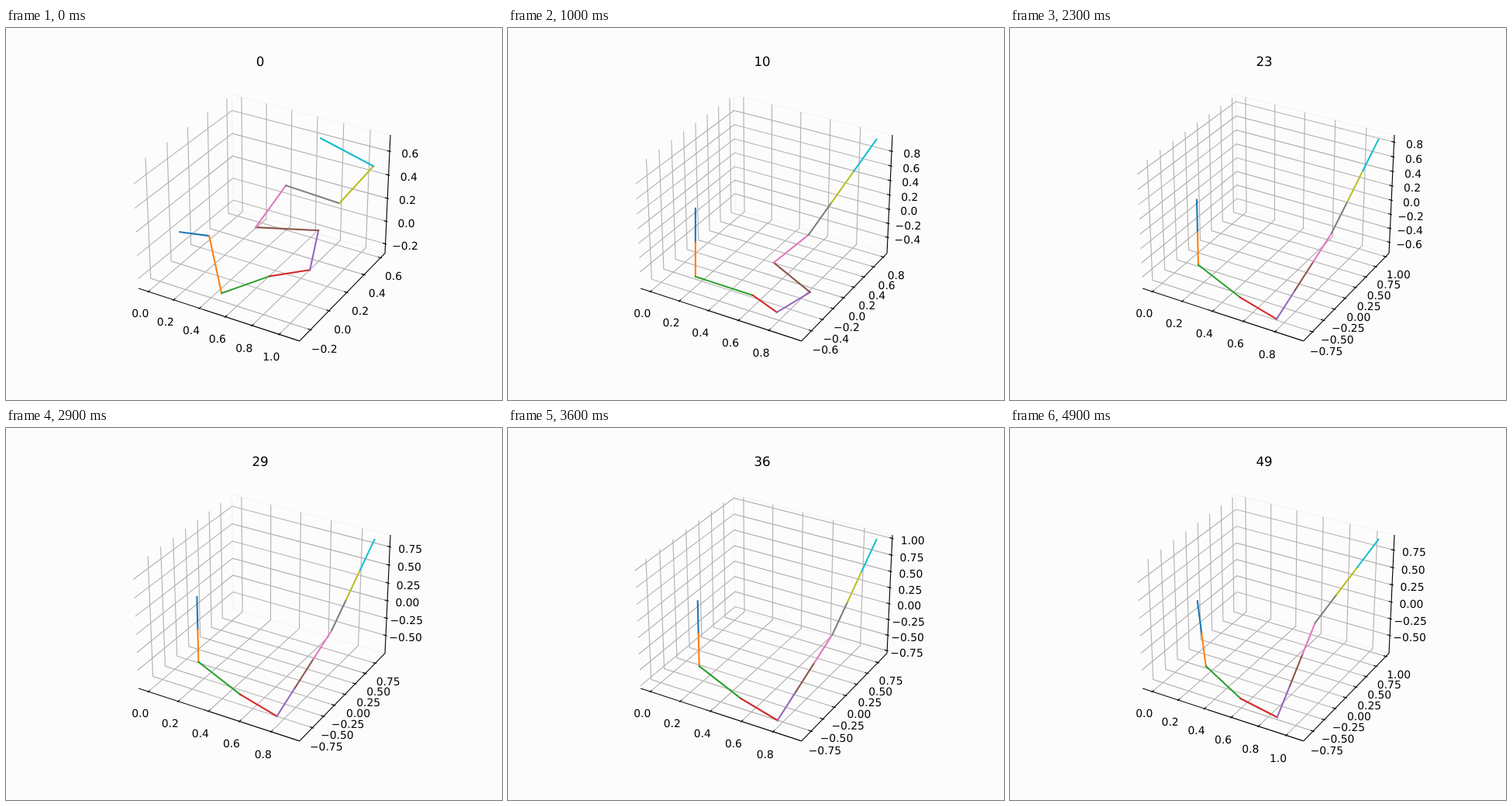
An HTML page for the animation above (5000 ms loop, 640 by 480 pixels).

```html
<!DOCTYPE html>
<html lang="en">
<head>
<meta charset="utf-8">
<title>Chain in 3D</title>
<style>
  html, body { margin: 0; width: 100%; height: 100%; overflow: hidden; background: #fcfcfc; }
  svg { display: block; width: 640px; height: 480px; }
  text {
    font-family: "DejaVu Sans", sans-serif; font-size: 13.89px;
    text-anchor: middle; text-rendering: geometricPrecision; fill: #000;
  }
  .title { font-size: 16.67px; }
  path { fill: none; stroke-width: 1.11; }
  .pane { stroke: #f2f2f2; }
  .grid { stroke: #b0b0b0; }
  .axis { stroke: #000; }
  .link { stroke-width: 2.08; stroke-linecap: square; }
</style>
</head>
<body>
<svg id="stage" viewBox="0 0 640 480"></svg>
<script>
const STEP_MS = 100, STEPS = 50, LINKS = 10;
const COLORS = ['#1f77b4', '#ff7f0e', '#2ca02c', '#d62728', '#9467bd',
                '#8c564b', '#e377c2', '#7f7f7f', '#bcbd22', '#17becf'];

// A shape lists the joints where the chain bends, as screen offsets from its base.
// Joints between bends are evenly spaced; the tip is the far corner of the data.
const SCATTERED = {
  1: [38, 5], 2: [54, 79], 3: [116, 57], 4: [168, 49], 5: [179, -2],
  6: [98, -6], 7: [137, -60], 8: [206, -37], 9: [250, -85], 10: [182, -121]
};
const FOLDED = { 2: [0, 88], 3: [74, 112], 4: [105, 134], 5: [148, 108], 6: [101, 70], 7: [146, 34] };
const BENT = { 2: [7, 92], 3: [72, 130], 4: [122, 168], 5: [159, 145], 6: [155, 100] };
const SETTLED = { 2: [2, 84], 3: [56, 126], 4: [103, 154], 7: [174, 43] };
const RAISED = { 2: [11, 84], 3: [56, 126], 4: [103, 150], 7: [152, 28] };

// Data bounds: xMax, yMin, yMax, zMin, zMax (x always starts at 0)
const POSES = [
  { step: 0, shape: SCATTERED, bounds: [1.07, -.253, .592, -.264, .715] },
  { step: 10, shape: FOLDED, bounds: [.94, -.673, .772, -.597, .985] },
  { step: 16, shape: BENT, bounds: [.824, -.711, .897, -.78, .765] },
  { step: 23, shape: SETTLED, bounds: [.91, -.817, .957, -.727, .862] },
  { step: 29, shape: SETTLED, bounds: [.91, -.907, .87, -.728, .878] },
  { step: 36, shape: SETTLED, bounds: [.91, -.827, .847, -.755, 1.014] },
  { step: 49, shape: RAISED, bounds: [1.047, -.832, .948, -.736, .928] }
];

// Camera: elevation 30, azimuth -60, distance 10
const SIZE = [1.1428, 1.1428, .8571];
const EDGE = SIZE.map(s => s * 25 / 48);
const PAD = SIZE.map(s => s / 12);
const RIGHT = [.8660, .5, 0], UP = [-.25, .4330, .8660], EYE = [.4330, -.75, .5];
const SCALE = 1997.8, CX = 333, CY = 237.4;

const dot = (a, b) => a[0] * b[0] + a[1] * b[1] + a[2] * b[2];
const mix = (a, b, k) => a.map((v, i) => v + (b[i] - v) * k);

function project(p) {
  const k = SCALE / (10 - dot(p, EYE));
  return [CX + k * dot(p, RIGHT), CY - k * dot(p, UP)];
}

const path = (pts, cls, color) =>
  `<path class="${cls}" d="M${pts.map(p => p.map(v => v.toFixed(2)).join(' ')).join('L')}"` +
  (color ? ` stroke="${color}"` : '') + '/>';
const path3 = (pts, cls) => path(pts.map(project), cls);
const text = (s, x, y, cls = '') =>
  `<text class="${cls}" x="${x.toFixed(2)}" y="${Math.round(y)}">${s}</text>`;

function ticks(lo, hi) {
  const raw = (hi - lo) / 8;
  const step = [.1, .2, .25, .5].find(s => s >= raw);
  const list = [];
  for (let i = Math.ceil(lo / step); i * step <= hi; i++) {
    const s = Math.abs(i * step).toFixed(step === .25 ? 2 : 1);
    list.push({ value: i * step, label: (i < 0 ? '\u2212' : '') + s });
  }
  return list;
}

// Each axis: where its grid line runs and where its tick sits, for position v
const [ex, ey, ez] = EDGE;
const AXES = [
  { grid: v => [[v, -ey, -ez], [v, ey, -ez], [v, ey, ez]], at: v => [v, -ey, -ez], tick: 1 },
  { grid: v => [[ex, v, -ez], [-ex, v, -ez], [-ex, v, ez]], at: v => [ex, v, -ez], tick: 0 },
  { grid: v => [[-ex, -ey, v], [-ex, ey, v], [ex, ey, v]], at: v => [ex, ey, v], tick: 0 }
];

const toWorld = (v, i, [lo, hi]) => ((v - lo) / (hi - lo) - .5) * SIZE[i];

function drawAxis(i, limits) {
  const a = AXES[i];
  let grid = '', marks = path3([a.at(-EDGE[i]), a.at(EDGE[i])], 'axis');
  for (const t of ticks(...limits)) {
    const v = toWorld(t.value, i, limits), p = a.at(v);
    grid += path3(a.grid(v), 'grid');
    const side = Math.sign(p[a.tick]);
    const ends = [.1, -.2].map(f => p.map((c, j) => j === a.tick ? c + side * f * PAD[j] : c));
    marks += path3(ends, 'axis');
    const spot = project(p.map((c, j) => j === i ? c : c + Math.sign(c) * 1.037 * PAD[j]));
    marks += text(t.label, spot[0], spot[1] + 11);
  }
  return { grid, marks };
}

// All joints of a shape, with even spacing between its bends
function joints(shape, base, tip) {
  const bends = { 0: [0, 0], [LINKS]: [tip[0] - base[0], tip[1] - base[1]], ...shape };
  const at = Object.keys(bends).map(Number);
  return Array.from({ length: LINKS + 1 }, (_, n) => {
    const hi = at.find(j => j >= n), lo = at.filter(j => j <= n).pop();
    const p = mix(bends[lo], bends[hi], hi > lo ? (n - lo) / (hi - lo) : 0);
    return [base[0] + p[0], base[1] + p[1]];
  });
}

const widen = (lo, hi) => [lo - (hi - lo) * .05, hi + (hi - lo) * .05];

function draw(step) {
  const next = Math.max(1, POSES.findIndex(p => p.step >= step));
  const a = POSES[next - 1], b = POSES[next];
  const k = (step - a.step) / (b.step - a.step);

  const [xMax, yMin, yMax, zMin, zMax] = mix(a.bounds, b.bounds, k);
  const limits = [widen(0, xMax), widen(yMin, yMax), [zMin, zMax]];
  const axes = limits.map((lim, i) => drawAxis(i, lim));

  const place = p => project(p.map((v, i) => toWorld(v, i, limits[i])));
  const base = place([0, 0, 0]), tip = place([xMax, yMax, zMax]);
  const to = joints(b.shape, base, tip);
  const pts = joints(a.shape, base, tip).map((p, i) => mix(p, to[i], k));

  return path3([[-ex, ey, -ez], [-ex, ey, ez], [ex, ey, ez], [ex, ey, -ez], [-ex, ey, -ez]], 'pane') +
    axes.map(x => x.grid).join('') +
    axes.map(x => x.marks).join('') +
    COLORS.map((c, i) => path([pts[i], pts[i + 1]], 'link', c)).join('') +
    text(step, 328, 49, 'title');
}

const stage = document.getElementById('stage');
let shown = -1;

function tick() {
  const step = Math.floor(performance.now() / STEP_MS) % STEPS;
  if (step !== shown) {
    stage.innerHTML = draw(step);
    shown = step;
  }
  requestAnimationFrame(tick);
}
tick();
</script>
</body>
</html>
```
